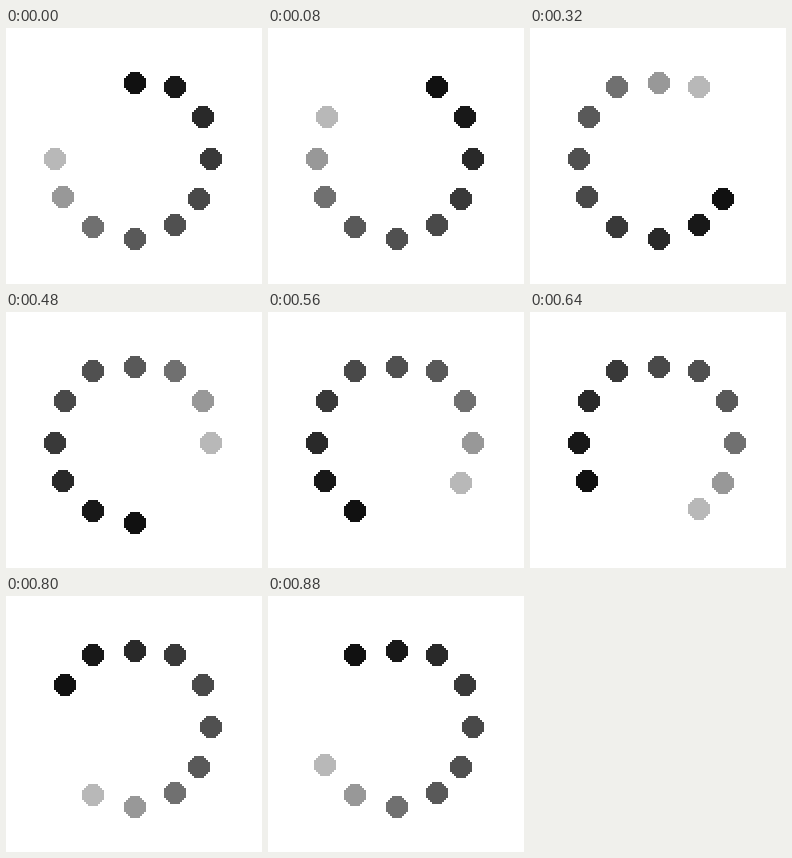
These frames come from a looping animation (256 px wide and 256 px high, 0.96 s). An HTML page with a canvas:

```html
<!DOCTYPE html>
<html>
<head>
<meta charset="utf-8">
<style>
html, body { margin: 0; width: 100%; height: 100%; overflow: hidden; background: #fff; }
canvas { display: block; width: 256px; height: 256px; image-rendering: pixelated; }
</style>
</head>
<body>
<canvas id="stage" width="128" height="128"></canvas>
<script>
const ctx = document.getElementById('stage').getContext('2d');
const STEP = 80;

// Centre cells of the dots, clockwise from the top
const dots = [
  [64, 27], [84, 29], [98, 44], [102, 65], [96, 85], [84, 98],
  [64, 105], [43, 99], [28, 84], [24, 65], [29, 44], [43, 29]
];

// Grey levels from the head of the ring onwards; the last two dots are hidden
const greys = [17, 24, 41, 57, 73, 80, 89, 112, 152, 184];

// Hard-edged disc, 11 cells wide
function disc(x, y, grey) {
  ctx.fillStyle = `rgb(${grey}, ${grey}, ${grey})`;
  for (let row = -5; row <= 5; row++) {
    const half = Math.floor(Math.sqrt(30.25 - row * row));
    ctx.fillRect(x - half, y + row, 2 * half + 1, 1);
  }
}

function draw(now) {
  const head = Math.floor(now / STEP) % dots.length;
  ctx.fillStyle = '#fff';
  ctx.fillRect(0, 0, 128, 128);
  greys.forEach((grey, i) => disc(...dots[(head + i) % dots.length], grey));
}

const start = performance.now();
function tick() {
  draw(performance.now() - start);
  requestAnimationFrame(tick);
}
tick();
</script>
</body>
</html>
```
